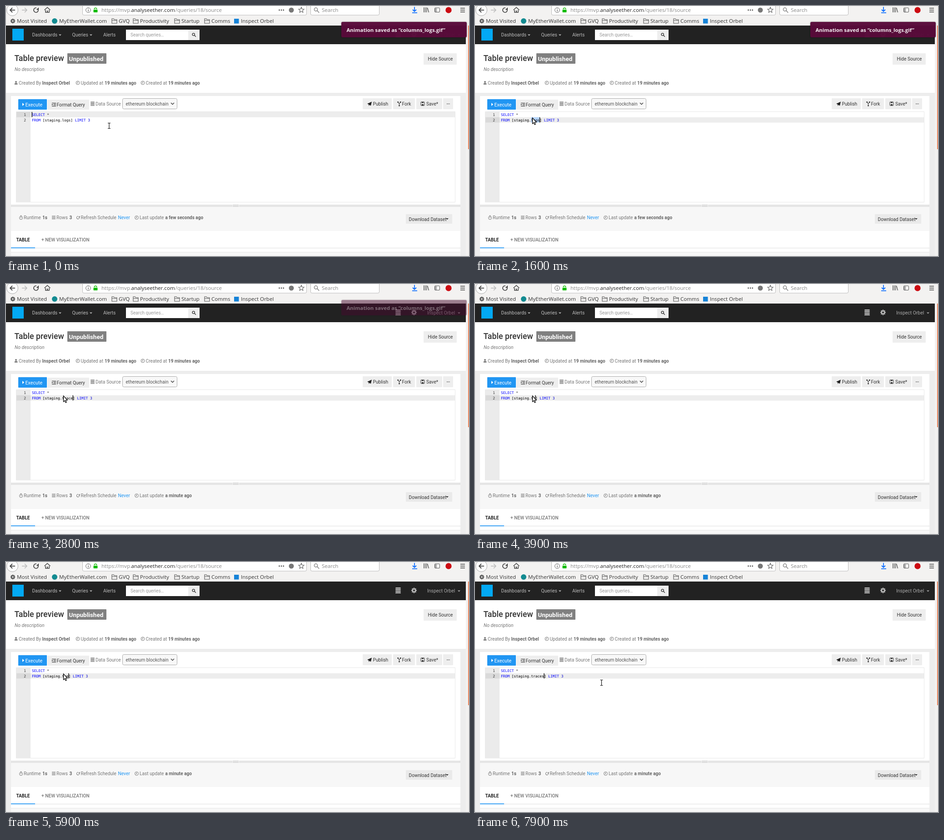
Animation, 1019 px wide and 550 px high, one loop 8000 ms. Source, as an HTML page with a canvas:

```html
<!DOCTYPE html>
<html lang="en">
<head>
<meta charset="utf-8">
<title>Query editor</title>
<style>
html, body { margin: 0; width: 100%; height: 100%; overflow: hidden; background: #fff; }
canvas { display: block; }
</style>
</head>
<body>
<canvas id="stage" width="1019" height="550"></canvas>
<script>
const ctx = document.getElementById('stage').getContext('2d');
const LOOP = 8000;
const ROBOTO = 'Roboto, sans-serif';
const OPEN = '"Open Sans", sans-serif';
const MONO = '"DejaVu Sans Mono", monospace';
const COL = 4.74;
const ACCOUNT = 'Inspect Orbel';

// [start, table name, popup entries]
const typing = [
  [0, 'logs', []],
  [1800, 't', ['true', 'table', 'type', 'text', 'natural', 'distinct', 'outer', 'integer']],
  [2000, 'tra', []], [2300, 'trac', []], [2400, 'trace', []],
  [3600, 'trac', []], [3800, 'tra', []], [3900, 'tr', []],
  [4300, 't', []], [4400, '', []],
  [4700, 'tr', ['true', 'natural', 'outer', 'integer']],
  [4800, 'tre', []], [6000, 'tr', []],
  [6300, 'tra', ['natural']],
  [6600, 'trac', []], [6700, 'trace', []], [6900, 'traces', []]
];

function box(x, y, w, h, fill, stroke, radius = 0) {
  ctx.beginPath();
  ctx.roundRect(x, y, w, h, radius);
  if (fill) { ctx.fillStyle = fill; ctx.fill(); }
  if (stroke) { ctx.strokeStyle = stroke; ctx.lineWidth = 1; ctx.stroke(); }
}

function text(str, x, y, size, color, weight = 400, family = ROBOTO) {
  ctx.font = `${weight} ${size}px ${family}`;
  ctx.fillStyle = color;
  ctx.fillText(str, x, y);
}

function path(points, stroke, width = 1, fill, close) {
  ctx.beginPath();
  for (let i = 0; i < points.length; i += 2) ctx.lineTo(points[i], points[i + 1]);
  if (close || fill) ctx.closePath();
  if (fill) { ctx.fillStyle = fill; ctx.fill(); }
  if (stroke) { ctx.strokeStyle = stroke; ctx.lineWidth = width; ctx.stroke(); }
}

function circle(x, y, r, fill, stroke, width = 1) {
  ctx.beginPath();
  ctx.arc(x, y, r, 0, Math.PI * 2);
  if (fill) { ctx.fillStyle = fill; ctx.fill(); }
  if (stroke) { ctx.strokeStyle = stroke; ctx.lineWidth = width; ctx.stroke(); }
}

function mono(str, col, y, color) {
  [...str].forEach((ch, i) => text(ch, 57 + (col + i) * COL, y, 7.9, color, 400, MONO));
}

const caretDown = (x, y, color) => path([x, y, x + 6, y, x + 3, y + 3], null, 0, color);

function gear(x, y, r, color, hole) {
  for (let i = 0; i < 8; i++) {
    const a = i * Math.PI / 4, c = Math.cos(a), s = Math.sin(a);
    path([x, y, x + c * r, y + s * r], color, r * 0.4);
  }
  circle(x, y, r * 0.72, color);
  circle(x, y, r * 0.32, hole);
}

function database(x, y, w, h, color) {
  for (let i = 0; i < 4; i++) box(x, y + i * h / 4, w, h / 4 - 0.9, color, null, [w / 3, w / 3, 2, 2]);
}

function clock(x, y) {
  circle(x, y, 3.9, null, '#777');
  path([x, y - 2.5, x, y + 0.5, x - 1.8, y + 0.5], '#777');
}

function magnifier(x, y, r, color, width) {
  circle(x, y, r, null, color, width);
  path([x + r * 0.7, y + r * 0.7, x + r * 2, y + r * 2], color, width);
}

function folder(x) {
  path([x, 28, x + 4, 28, x + 5.5, 30, x + 11, 30, x + 11, 38, x, 38], '#555', 1.1, null, true);
  path([x, 32, x + 11, 32], '#555', 1);
}

function lines(x, y, w, count, gap, color, width = 1) {
  for (let i = 0; i < count; i++) box(x, y + i * gap, w, width, color);
}

function star(x, y, r) {
  const pts = [];
  for (let i = 0; i < 10; i++) {
    const a = i * Math.PI / 5 - Math.PI / 2, d = i % 2 ? r * 0.45 : r;
    pts.push(x + d * Math.cos(a), y + d * Math.sin(a));
  }
  path(pts, '#555', 1.1, null, true);
}

function refresh(x, y, r, color, width) {
  ctx.beginPath();
  ctx.arc(x, y, r, -0.5, 4.9);
  ctx.strokeStyle = color;
  ctx.lineWidth = width;
  ctx.stroke();
  path([x + r + 1, y - r - 1, x + r + 1, y - 0.5, x + 0.5, y - 0.5], null, 0, color);
}

function drawBrowser() {
  box(0, 0, 1019, 43, '#f3f2f1');
  box(168.5, -6, 493, 26, '#fff', '#bbb', 3);
  box(670.5, -6, 151, 26, '#fff', '#bbb', 3);

  circle(14, 9, 12.5, '#fcfcfc', '#aaa');
  path([20, 9, 9, 9], '#444', 1.8);
  path([14, 4, 9, 9, 14, 14], '#444', 1.8);
  path([35, 9, 46, 9], '#bbb', 1.6);
  path([41, 4, 46, 9, 41, 14], '#bbb', 1.6);
  refresh(66, 9, 5, '#444', 1.7);
  path([84.5, 9, 91, 3, 97.5, 9], '#444', 1.6);
  path([87, 9, 87, 14, 95, 14, 95, 9], '#444', 1.6);
  box(90, 10, 2, 4, '#444');

  circle(181, 9, 5.3, null, '#666');
  box(180.4, 8, 1.3, 4, '#666');
  box(180.4, 5.5, 1.3, 1.3, '#666');
  box(192.5, 8, 9, 6, '#12bc00', null, 1);
  ctx.beginPath();
  ctx.arc(197, 7, 2.8, Math.PI, 0);
  ctx.strokeStyle = '#12bc00';
  ctx.lineWidth = 1.6;
  ctx.stroke();

  text('https://mvp.', 210, 13, 11.6, '#888', 400, OPEN);
  text('analyseether.com', 275.5, 13, 11.6, '#222', 400, OPEN);
  text('/queries/18/source', 372.5, 13, 11.6, '#888', 400, OPEN);
  for (let i = 0; i < 3; i++) circle(601.5 + i * 4.6, 9, 1.4, '#555');
  circle(628, 9, 5.5, '#777');
  star(650, 9, 6.3);
  magnifier(682, 7.5, 3.6, '#777', 1.3);
  text('Search', 695, 13, 11.6, '#888', 400, OPEN);

  path([899, 2, 899, 12], '#0a6cff', 1.8);
  path([895, 8, 899, 12, 903, 8], '#0a6cff', 1.8);
  box(894, 14, 11, 1.7, '#0a6cff');
  for (let i = 0; i < 3; i++) box(919 + i * 3, 3, 1.3, 11, '#555');
  path([927.5, 4, 930.5, 14], '#555', 1.4);
  box(943.5, 4, 11, 9.5, null, '#555', 1.5);
  box(944, 5, 4, 8, '#aaa');
  circle(974, 9, 6.7, '#cc0b12');
  lines(1000, 4, 10, 3, 4.2, '#444', 1.5);

  gear(15, 33, 5.3, '#555', '#f3f2f1');
  circle(107, 33, 6, '#128b91');
  [233, 280, 371, 437].forEach(folder);
  box(502, 28, 10.5, 10.5, '#1683d8');
  const marks = [['Most Visited', 24], ['MyEtherWallet.com', 117], ['GVQ', 248],
    ['Productivity', 295], ['Startup', 386], ['Comms', 452], [ACCOUNT, 517]];
  for (const [name, x] of marks) text(name, x, 37, 11.6, '#333', 400, OPEN);
}

function drawNav() {
  box(0, 43, 1012, 41, '#222');
  box(14, 50, 25, 26, '#03a9f4');
  text('Dashboards', 57.5, 67, 10.4, '#bbb');
  caretDown(116, 62.5, '#bbb');
  text('Queries', 145.5, 67, 10.4, '#bbb');
  caretDown(184, 62.5, '#bbb');
  text('Alerts', 214, 67, 10.4, '#bbb');
  box(264, 52, 137, 23, '#fff');
  text('Search queries…', 274, 67, 10.1, '#999');
  box(401, 52, 25, 23, '#eee');
  magnifier(412.7, 62.5, 2.6, '#333', 1.3);
  database(857, 56, 12, 14, '#bbb');
  gear(898, 62.5, 6, '#bbb', '#222');
  text(ACCOUNT, 927, 67, 10.4, '#aaa');
  caretDown(994, 62.5, '#aaa');
}

function drawHeader() {
  box(0, 84, 1012, 107, '#fff');
  text('Table preview', 18.5, 121, 17.8, '#333', 500);
  box(135, 104, 86, 23, '#808080', null, 1);
  text('Unpublished', 138.5, 120.5, 13.5, '#fff', 700);
  text('No description', 19, 143, 10.4, '#767676', 'italic 400');
  box(919, 104, 73, 25, '#eee', null, 1);
  text('Hide Source', 928.5, 120, 10.2, '#333');

  circle(22, 167, 1.9, '#777');
  box(18.8, 169.4, 6.6, 3.4, '#777', null, [2, 2, 0, 0]);
  text('Created By', 28, 173, 10.2, '#767676');
  text(ACCOUNT, 79.5, 173, 10.2, '#666', 700);
  clock(158, 169);
  text('Updated at', 164.5, 173, 10.2, '#767676');
  text('19 minutes ago', 217, 173, 10, '#666', 700);
  clock(301, 169);
  text('Created at', 307.5, 173, 10.2, '#767676');
  text('19 minutes ago', 357, 173, 10, '#666', 700);
}

function drawToolbar() {
  box(11, 198, 989, 239, '#fff');
  box(27, 205, 63, 23, '#2196f3', null, 1);
  path([36, 213, 40, 216.5, 36, 220], null, 0, '#fff');
  text('Execute', 42.5, 220.5, 10.7, '#fff');
  box(91, 206, 92, 22, '#eee', null, 1);
  lines(101, 213, 9, 1, 2, '#333');
  lines(104.5, 215.3, 5.5, 2, 2.3, '#333');
  lines(101, 220, 9, 1, 2, '#333');
  path([101, 215, 103.3, 217, 101, 219], null, 0, '#333');
  text('Format Query', 111.5, 220.5, 10.3, '#333');
  database(186, 210.5, 9, 10, '#777');
  text('Data Source', 197, 219, 10.3, '#767676');
  box(256.5, 203.5, 120, 23, '#f8f8f8', '#aaa', 3);
  text('ethereum blockchain', 263.5, 219, 10.15, '#555');
  path([363, 213, 366.5, 216.5, 370, 213], '#444', 1.5);

  [[785, 64], [852, 48], [903, 57], [962, 22]].forEach(([x, w]) => box(x, 203, w, 24, '#eee', null, 1));
  path([795, 215, 805, 210.5, 803, 219.5, 800, 217.5, 798.5, 220, 798.2, 216.5], null, 0, '#222');
  text('Publish', 807.5, 219, 10.2, '#333');
  path([863, 212, 865.5, 215, 865.5, 220], '#333', 1.1);
  path([868, 212, 865.5, 215], '#333', 1.1);
  [[862.7, 211.5], [868.3, 211.5], [865.5, 219.3]].forEach(([x, y]) => circle(x, y, 1.4, '#333'));
  text('Fork', 871.5, 219, 10.2, '#333');
  box(913, 211, 8, 8, null, '#333', 1);
  box(915, 211, 4, 2.5, '#333');
  box(915, 216, 4, 3, '#333');
  text('Save*', 925, 219, 10.2, '#333');
  for (let i = 0; i < 3; i++) box(970 + i * 2.6, 214.7, 1.4, 1.4, '#333');
}

function drawResults(age) {
  box(11, 437, 989, 5, '#e5e5e5');
  box(498, 437, 15, 5, '#f4f4f4');
  lines(499, 437.5, 13, 2, 3, '#aaa', 0.8);
  box(11, 442, 989, 53, '#f7f7f7');
  circle(33, 466.2, 3.5, null, '#777');
  path([33, 464, 33, 466.5], '#777');
  box(31.3, 460.8, 3.4, 1, '#777');
  text('Runtime', 39, 469, 10.2, '#767676');
  text('1s', 80, 469, 10.2, '#666', 700);
  lines(101, 461.5, 8, 4, 2.2, '#777');
  text('Rows', 111, 469, 10.2, '#767676');
  text('3', 139.5, 469, 10.2, '#666', 700);
  refresh(158.5, 465.5, 3, '#777', 1.1);
  text('Refresh Schedule', 164.5, 469, 10.1, '#767676');
  text('Never', 246.5, 469, 10.2, '#2196f3');
  clock(287.5, 465.5);
  text('Last update', 294, 469, 10.2, '#767676');
  text(age, 350.5, 469, 10, '#666', 700);
  box(880, 458, 102, 21, '#eaeaea', null, 1);
  text('Download Dataset', 886.5, 472.5, 10.2, '#333');
  caretDown(968, 467, '#333');

  box(11, 495, 989, 55, '#fff');
  box(11, 532, 989, 1, '#ddd');
  box(11, 531.3, 53, 1.7, '#2196f3');
  text('TABLE', 22.5, 518, 10, '#222', 700);
  text('+ NEW VISUALIZATION', 78, 518, 10.2, '#767676', 500);
  box(11, 541, 989, 9, '#f7f7f7');
  box(11, 541, 989, 1, '#e6e6e6');
}

function drawEditor(time, name) {
  const row = time < 1100 ? 0 : 1;
  const selected = time >= 1200 && time < 1800;
  const y = 233 + row * 11.7;
  box(22.5, 232.5, 966, 199, '#fff', '#e8e8e8');
  box(23, 233, 31, 199, '#ebebeb');
  box(23, y, 31, 11.7, '#dadada');
  box(54, y, 934, 11.7, '#ededed');
  if (selected) box(57 + 14 * COL, y, 4 * COL, 11.7, '#b5d5ff');
  mono('1', -3.75, 241.7, '#333');
  mono('2', -3.75, 253.7, '#333');
  mono('SELECT', 0, 241.7, '#00f');
  mono('*', 7, 241.7, '#333');
  mono('FROM', 0, 253.7, '#00f');
  mono(`[staging.${name}]`, 5, 253.7, '#000');
  const end = 16 + name.length;
  mono('LIMIT', end, 253.7, '#00f');
  mono('3', end + 6, 253.7, '#0000cd');
  const col = row === 0 ? 0 : time < 1200 ? 16 : 14 + name.length;
  box(56.6 + col * COL, y, 1.3, 11.5, '#000');
}

function drawPopup(entries, typed) {
  if (!entries.length) return;
  const rowHeight = 13.25, height = entries.length * rowHeight - 1.5;
  ctx.save();
  ctx.shadowColor = 'rgba(0,0,0,.3)';
  ctx.shadowBlur = 3;
  ctx.shadowOffsetX = 1.5;
  ctx.shadowOffsetY = 2;
  box(119, 257, 219, height, '#fbfbfb');
  ctx.restore();
  box(119, 257, 219, rowHeight - 1, '#c8d6ea');
  box(119, 256.5, 219, height, null, '#bbb');
  entries.forEach((word, i) => {
    const y = 266.2 + i * rowHeight;
    let match = 0;
    [...word].forEach((ch, k) => {
      const hit = ch === typed[match];
      if (hit) match++;
      text(ch, 122.5 + k * COL, y, 7.9, hit ? '#000' : '#444', hit ? 700 : 400, MONO);
    });
    text('keyword', 301, y, 7.9, '#777', 400, MONO);
  });
}

function drawBubble(alpha) {
  if (alpha <= 0) return;
  ctx.save();
  ctx.globalAlpha = alpha;
  ctx.shadowColor = 'rgba(0,0,0,.5)';
  ctx.shadowBlur = 3;
  box(738, 35, 276, 34, '#5b0b3c', null, 3);
  ctx.shadowBlur = 0;
  text('Animation saved as “columns_logs.gif”', 749.5, 56.5, 11.4, '#fff', 700, OPEN);
  ctx.restore();
}

function drawBeam(x, y) {
  const parts = [[x - 3, y - 6.5, 6, 1], [x - 0.6, y - 6.5, 1.2, 13], [x - 3, y + 5.5, 6, 1]];
  for (const [a, b, w, h] of parts) box(a - 0.7, b - 0.7, w + 1.4, h + 1.4, '#fff');
  for (const [a, b, w, h] of parts) box(a, b, w, h, '#111');
}

function drawPointer(time) {
  const steps = (start, count) => Math.max(0, Math.min(1, (time - start) / (count * 100)));
  const ease = p => p * p * (3 - 2 * p);
  if (time < 1300) {
    const p = ease(steps(0, 8));
    drawBeam(227 - 95 * p, 263.5 - 11.5 * p + 7 * Math.sin(Math.PI * p));
  } else if (time < 7300) {
    path([126.5, 246, 126.5, 259, 129.3, 256.5, 131.2, 261, 133.2, 260.1, 131.3, 255.8, 135, 255.5],
      '#000', 1.2, '#fff');
  } else {
    const p = ease(steps(7200, 7));
    drawBeam(132 + 146.5 * p, 252 + 13.5 * p);
  }
}

function draw(now) {
  const time = Math.floor((now % LOOP) / 100) * 100;
  const [, name, popup] = typing.findLast(([start]) => start <= time);
  box(0, 0, 1019, 550, '#ededed');
  drawBrowser();
  drawNav();
  drawHeader();
  drawToolbar();
  drawEditor(time, name);
  drawResults(time < 2600 ? 'a few seconds ago' : 'a minute ago');
  box(1012, 43, 7, 507, '#f2f1f0');
  box(1017, 43, 2, 272, '#ec8a62');
  drawPopup(popup, name);
  drawBubble(0.95 * Math.min(1, (3000 - time) / 500));
  drawPointer(time);
}

function frame(now) {
  draw(now);
  requestAnimationFrame(frame);
}
draw(0);
requestAnimationFrame(frame);
</script>
</body>
</html>
```
